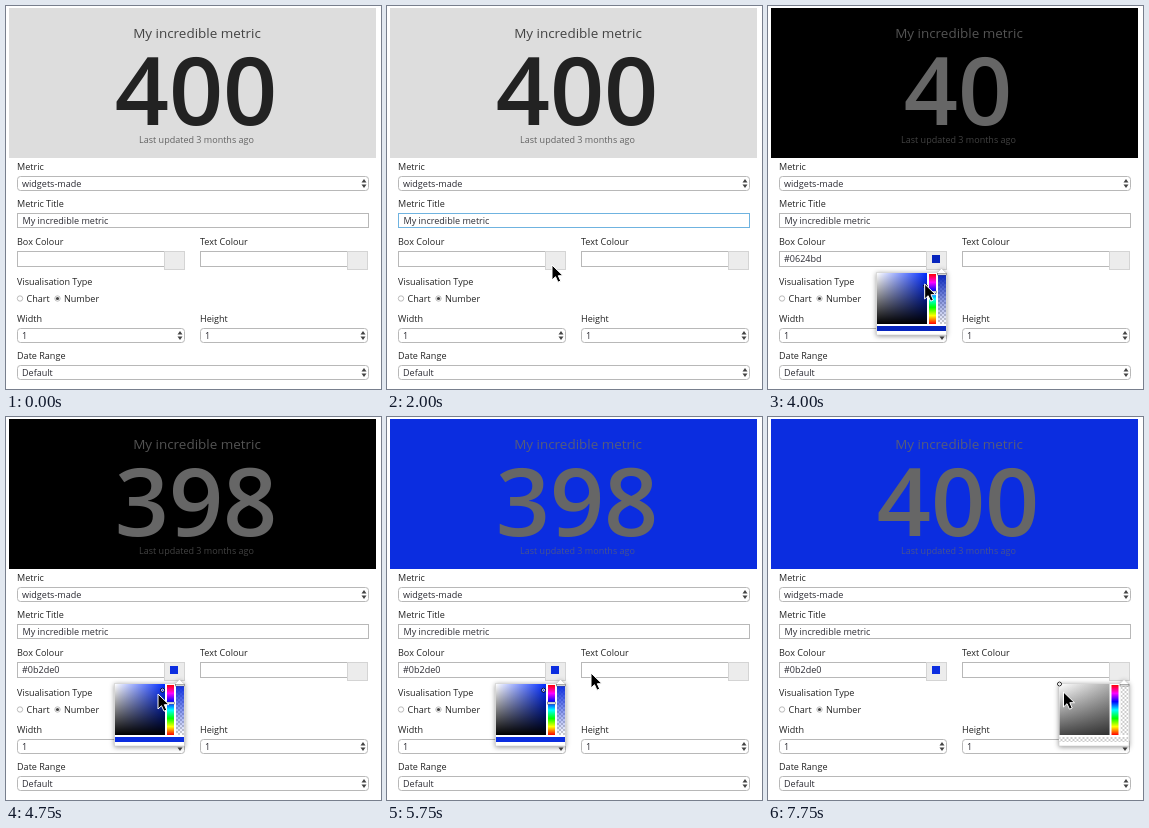
These frames come from a looping animation (375x383 px, 8 s). An HTML page:

```html
<!DOCTYPE html>
<html lang="en">
<head>
<meta charset="utf-8">
<title>Metric widget editor</title>
<style>
  html, body { margin: 0; width: 100%; height: 100%; overflow: hidden; background: #fff; }
  svg { display: block; width: 100%; height: 100%; }
  text { font: 9.05px "Open Sans", "Noto Sans", sans-serif; fill: #222; white-space: pre; }
  .mid { text-anchor: middle; }
  .big { font-size: 95px; font-weight: 600; }
  .title { font-size: 13.46px; opacity: .82; }
  .note { font-size: 9.03px; opacity: .65; }
  .value { fill: #2b2b33; }
  .panel { filter: drop-shadow(0 1px 2.5px rgba(0, 0, 0, .4)); }
</style>
</head>
<body>
<svg viewBox="0 0 375 383" preserveAspectRatio="xMinYMin meet">
  <defs>
    <linearGradient id="sat">
      <stop stop-color="#fff"/><stop id="satEnd" offset="1"/>
    </linearGradient>
    <linearGradient id="dark" x2="0" y2="1">
      <stop stop-opacity="0"/><stop id="darkEnd" offset="1"/>
    </linearGradient>
    <linearGradient id="hues" x2="0" y2="1"></linearGradient>
    <linearGradient id="fade" x2="0" y2="1">
      <stop id="fadeTop"/><stop id="fadeEnd" offset="1" stop-opacity="0"/>
    </linearGradient>
    <pattern id="check" width="4" height="4" patternUnits="userSpaceOnUse">
      <path d="M0 0h4v4h-4z" fill="#fff"/><path d="M0 0h2v2h-2zM2 2h2v2h-2z" fill="#ccc"/>
    </pattern>
  </defs>
  <g id="widget">
    <rect id="box" x="3" y="2" width="367" height="150"/>
    <text class="mid title" x="191" y="32">My incredible metric</text>
    <text class="mid big" id="count" x="190" y="119"></text>
    <text class="mid note" x="190.5" y="137">Last updated 3 months ago</text>
  </g>
  <g id="form"></g>
  <g id="picker">
    <path class="panel" d="M108.5 266.5h61l4-4 4 4h1v62.500h-70z" fill="#fff" stroke="#ccc" stroke-width=".6"/>
    <rect x="109" y="267" width="50" height="51" fill="url(#sat)"/>
    <rect x="109" y="267" width="50" height="51" fill="url(#dark)"/>
    <rect x="161" y="268" width="7" height="50" fill="url(#hues)"/>
    <rect x="170" y="268" width="8" height="50" fill="url(#check)"/>
    <rect x="170" y="268" width="8" height="50" fill="url(#fade)"/>
    <rect x="109" y="320" width="69" height="5" fill="url(#check)"/>
    <rect id="bar" x="109" y="320" width="69" height="5"/>
    <rect id="hueMark" x="160.500" width="8" height="2" fill="#fff" stroke="#555" stroke-width=".5"/>
    <rect x="169.500" y="267.500" width="9" height="1.500" fill="#fff" stroke="#555" stroke-width=".5"/>
    <g id="spot"><circle r="1.900" stroke="#000" stroke-width="1" fill="none"/><circle r="1.200" stroke="#fff" stroke-width=".8" fill="none"/></g>
  </g>
  <path id="cursor" d="M0 0V15L3.500 11.700 6 17.200 8.700 16 6.300 10.700H11Z" fill="#000" stroke="#fff" stroke-width="1" stroke-linejoin="round"/>
</svg>
<script>
const NS = "http://www.w3.org/2000/svg";
const $ = id => document.getElementById(id);
const LOOP = 8000, STEP = 250;
const HUE = 230, BLUE = "#0b2de0";

function add(parent, tag, attrs, content = "") {
  const el = document.createElementNS(NS, tag);
  for (const k in attrs) el.setAttribute(k, attrs[k]);
  el.textContent = content;
  parent.appendChild(el);
  return el;
}
const set = (id, attrs) => { for (const k in attrs) $(id).setAttribute(k, attrs[k]); };
const show = (id, on) => set(id, { visibility: on ? "visible" : "hidden" });

const form = $("form");
const label = (x, y, s) => add(form, "text", { x, y }, s);
const value = (x, y, s) => add(form, "text", { x, y, class: "value" }, s);

function field(x, y, w, h, rx = 0) {
  return add(form, "rect", { x: x + .5, y: y + .5, width: w - 1, height: h - 1, rx, fill: "#fff", stroke: "#b8b8b8" });
}
function select(x, y, w, s) {
  field(x, y, w, 15, 3);
  value(x + 5, y + 10.500, s);
  const ax = x + w - 5;
  add(form, "path", { d: `M${ax - 2.500} ${y + 6.500}h5l-2.500-3.500zM${ax - 2.500} ${y + 8.500}h5l-2.500 3.500z`, fill: "#444" });
}
function radio(x, s, on) {
  add(form, "circle", { cx: x, cy: 292.500, r: 2.700, fill: "#fff", stroke: "#aaa", "stroke-width": .8 });
  if (on) add(form, "circle", { cx: x, cy: 292.500, r: 1.600, fill: "#444" });
  add(form, "text", { x: x + 6.500, y: 296, fill: "#222" }, s);
}
function colourField(x, s) {
  label(x, 239, s);
  const input = field(x, 245, 148, 16);
  add(form, "rect", { x: x + 147.500, y: 245.500, width: 20, height: 18, fill: "#ececec", stroke: "#d4d4d4" });
  const chip = add(form, "rect", { x: x + 153, y: 249, width: 8, height: 8 });
  return { input, chip, text: value(x + 5, 256, "") };
}

label(11, 164, "Metric");
select(11, 170, 352, "widgets-made");
label(11, 201, "Metric Title");
const titleInput = field(11, 207, 352, 15);
value(16.500, 218, "My incredible metric");
const boxColour = colourField(11, "Box Colour");
const textColour = colourField(194, "Text Colour");
label(11, 279, "Visualisation Type");
radio(14, "Chart", false);
radio(51.500, "Number", true);
label(11, 316, "Width");
select(11, 322, 168, "1");
label(194, 316, "Height");
select(194, 322, 168, "1");
label(11, 353, "Date Range");
select(11, 359, 352, "Default");

for (let i = 0; i <= 6; i++)
  add($("hues"), "stop", { offset: i / 6, "stop-color": `hsl(${360 - i * 60},100%,50%)` });

// Pointer stops: time, x, y
const path = [
  [500, 334, 261], [750, 284, 262], [1000, 222, 262], [1250, 170, 260], [1500, 153, 257],
  [2000, 165, 259], [2250, 166, 259], [2750, 164, 286], [3500, 164, 286], [3750, 157, 280],
  [4500, 156, 274], [4750, 152, 277], [5250, 175, 267], [5750, 204, 256], [6000, 204, 256],
  [6750, 346.500, 257], [7000, 350, 258], [7250, 350, 259], [7750, 295.500, 275]
];
function pointer(t) {
  const i = path.findIndex(p => p[0] >= t);
  const b = path[i < 0 ? path.length - 1 : i], a = path[Math.max(0, i - 1)];
  const k = i > 0 ? (t - a[0]) / (b[0] - a[0]) : 1;
  return [a[1] + (b[1] - a[1]) * k, a[2] + (b[2] - a[2]) * k];
}

function hsvHex(h, s, v) {
  const channel = n => {
    const k = (n + h / 60) % 6;
    return Math.round(255 * v * (1 - s * Math.max(0, Math.min(k, 4 - k, 1))));
  };
  return "#" + [5, 3, 1].map(n => channel(n).toString(16).padStart(2, "0")).join("");
}

// Chosen saturation and brightness while dragging
function picked(t) {
  if (t < 4000) return [0, 0];
  if (t >= 4750) return [.951, .878];
  const k = (t - 4000) / 750;
  return [.97 - .019 * k, .74 + .138 * k];
}

function count(t) {
  const start = t < 4795 ? 3795 : 4795;
  const k = Math.min(1, (t - start) / 1000);
  return t < 3795 ? 400 : Math.round(400 * (.5 - .5 * Math.cos(Math.PI * k)));
}

function drawPicker(t) {
  const second = t >= 7250;
  const open = t >= 2250 && t < 6000 || second;
  const blank = t < 3500 || second;
  show("picker", open);
  const [s, v] = blank ? [0, 1] : picked(t);
  const colour = blank ? "none" : t >= 4750 ? BLUE : hsvHex(HUE, s, v);
  set("picker", { transform: `translate(${second ? 182.500 : 0} 0)` });
  set("satEnd", { "stop-color": blank ? "#b0b0b0" : `hsl(${HUE},100%,50%)` });
  set("darkEnd", { "stop-opacity": blank ? .72 : 1 });
  set("fadeTop", { "stop-color": blank ? "#fff" : colour, "stop-opacity": blank ? 0 : 1 });
  set("fadeEnd", { "stop-color": blank ? "#fff" : colour });
  set("bar", { fill: colour });
  show("hueMark", open && !blank);
  set("hueMark", { y: 267 + 50 * (1 - HUE / 360) });
  set("spot", { transform: `translate(${109 + 50 * s} ${267 + 51 * (1 - v)})` });
  return colour;
}

function render(ms) {
  const t = Math.floor(ms % LOOP / STEP) * STEP;
  const colour = drawPicker(t);
  const chosen = t >= 4750 ? BLUE : colour;
  boxColour.text.textContent = t < 3500 ? "" : chosen;
  boxColour.chip.setAttribute("fill", t < 3500 ? "none" : chosen);
  textColour.chip.setAttribute("fill", "none");

  const focus = (el, on) => el.setAttribute("stroke", on ? "#6fb3e0" : "#b8b8b8");
  focus(titleInput, t >= 1750 && t < 2250);
  focus(textColour.input, t >= 6000 && t < 7250);

  set("box", { fill: t < 3795 ? "#ddd" : t < 4795 ? "#000" : BLUE });
  for (const el of $("widget").querySelectorAll("text")) el.style.fill = t < 3795 ? "#222" : "#666";
  $("count").textContent = count(t);

  show("cursor", t >= 500);
  set("cursor", { transform: `translate(${pointer(t).join(" ")})` });
}

const start = performance.now();
function tick() {
  render(performance.now() - start);
  requestAnimationFrame(tick);
}
tick();
</script>
</body>
</html>
```
